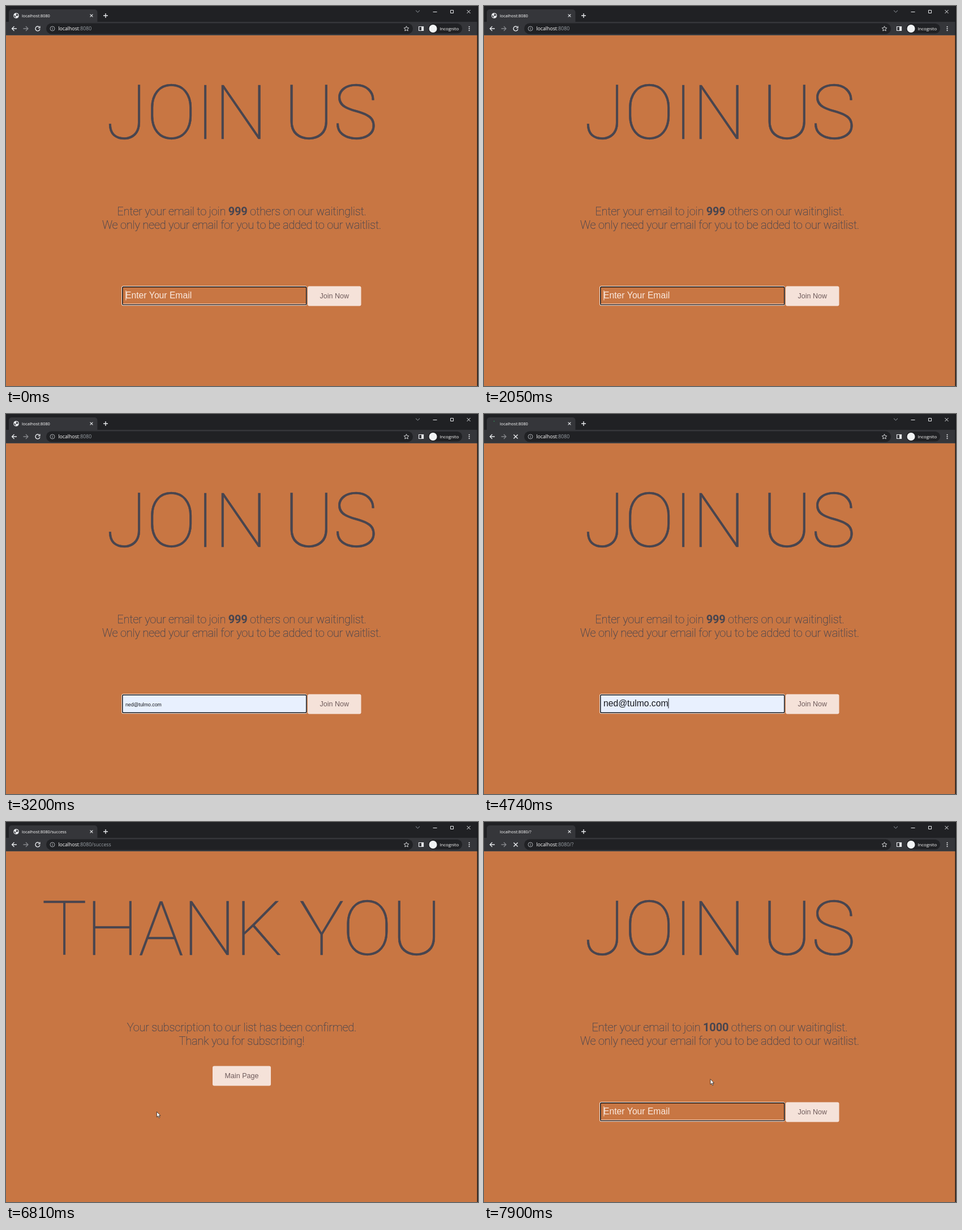
Recreate the animation shown at these times as an HTML page with a canvas. Size 834 by 672 pixels, loop 8000 ms.

```html
<!DOCTYPE html>
<html lang="en">
<head>
<meta charset="utf-8">
<title>Waiting list</title>
<style>
  html, body { margin: 0; width: 100%; height: 100%; overflow: hidden; background: #c87643; }
  canvas { display: block; }
</style>
</head>
<body>
<canvas id="stage" width="834" height="672"></canvas>
<script>
const ctx = document.getElementById('stage').getContext('2d');
const LOOP = 8000;
const CENTER = 416.5;
const EMAIL = 'ned@tulmo.com';

const color = {
  page: '#c87643', ink: '#48454f', cream: '#f5e2d9', buttonText: '#6f5b5b',
  frame: '#202124', toolbar: '#35363a', light: '#e8eaed', dim: '#9aa0a6',
  autofill: '#e8f0fe'
};
const ui = size => `400 ${size}px "Open Sans", sans-serif`;
const arial = size => `400 ${size}px "Liberation Sans", Arial, sans-serif`;
const roboto = (weight, size) => `${weight} ${size}px Roboto, sans-serif`;

function text(str, x, y, font, fill, align = 'left') {
  ctx.font = font;
  ctx.fillStyle = fill;
  ctx.textAlign = align;
  ctx.fillText(str, x, y);
  return ctx.measureText(str).width;
}

function rect(x, y, w, h, fill) {
  ctx.fillStyle = fill;
  ctx.fillRect(x, y, w, h);
}

function round(x, y, w, h, r, fill) {
  ctx.beginPath();
  ctx.roundRect(x, y, w, h, r);
  ctx.fillStyle = fill;
  ctx.fill();
}

function disc(x, y, r, fill) {
  ctx.beginPath();
  ctx.arc(x, y, r, 0, Math.PI * 2);
  ctx.fillStyle = fill;
  ctx.fill();
}

// Strokes an SVG path placed at x, y.
function icon(x, y, d, stroke = color.light, width = 1.2) {
  ctx.save();
  ctx.translate(x, y);
  ctx.strokeStyle = stroke;
  ctx.lineWidth = width;
  ctx.stroke(new Path2D(d));
  ctx.restore();
}

function cross(x, y, r, width = 1.1) {
  icon(x, y, `M${-r} ${-r}L${r} ${r}M${r} ${-r}L${-r} ${r}`, color.light, width);
}

function globe(x, y) {
  disc(x, y, 4.8, color.light);
  ctx.save();
  ctx.translate(x, y);
  ctx.fillStyle = color.toolbar;
  ctx.fill(new Path2D('M-3.7 -1L-1 1.2L-1 3.6Q-3.8 2.8 -3.7 -1ZM0 -3.8Q3.6 -3 3.7 .2L1.6 -.2L1.2 1.2L-.9 -.6L.6 -1.8Z'));
  ctx.restore();
}

function tabBar(title, favicon) {
  rect(0, 0, 834, 28, color.frame);
  round(5, 6, 156.5, 24, [5, 5, 0, 0], color.toolbar);
  if (favicon === 'globe') globe(18, 17);
  else if (favicon) rect(17, 12, 1.5, 1.5, favicon);
  text(title, 28, 19.6, ui(7.4), '#fff');
  cross(151, 17, 2.4);
  icon(176, 17, 'M-4 0H4M0 -4V4', color.light, 1.4);
  icon(727.5, 9.5, 'M-3.5 -1.7L0 1.7L3.5 -1.7', color.dim, 1);
  icon(758, 10.5, 'M-3.5 0H3.5', color.light, 1);
  icon(788, 10, 'M-2.5 -2.5H2.5V2.5H-2.5Z', color.light, 1);
  cross(817.5, 10, 3, 1);
}

function toolbar(path, loading) {
  rect(0, 28, 834, 23, color.toolbar);
  rect(0, 51, 834, 1, '#504b49');
  icon(14.5, 40, 'M4.5 0H-4M0 -4L-4 0L0 4', color.light, 1.3);
  icon(35, 40, 'M-4.5 0H4M0 -4L4 0L0 4', '#85878b', 1.3);
  if (loading) cross(56, 40, 3.6, 1.4);
  else {
    icon(56, 40, 'M3 -2.6A4 4 0 1 0 3.9 1', color.light, 1.4);
    icon(56, 40, 'M4 -4.5V-1.2H.8', color.light, 1.2);
  }

  round(71, 30.5, 648, 19, 9.5, color.frame);
  icon(82, 40, 'M4 0A4 4 0 1 1 -4 0A4 4 0 1 1 4 0M0 -.6V2.2M0 -2.2V-1.2', '#b4b7bb', 0.9);
  const host = text('localhost', 92.3, 43.2, ui(8.75), '#fff');
  text(':8080' + path, 92.3 + host, 43.2, ui(8.75), color.dim);
  icon(707.5, 40, 'M0 -4.3L1.3 -1.4L4.3 -1.1L2 1L2.7 4L0 2.4L-2.7 4L-2 1L-4.3 -1.1L-1.3 -1.4Z', color.light, 0.9);
  icon(733.5, 40, 'M-4 -3.5H4V3.5H-4Z', color.light, 1.2);
  rect(734, 36, 4, 8, color.light);
  round(746, 31, 60, 17.5, 8.75, color.frame);
  disc(754.5, 40, 7, '#f1f3f4');
  text('Incognito', 766.3, 42.8, ui(7.8), '#fff');
  for (const dy of [-3.3, 0, 3.3]) disc(818.5, 40 + dy, 1.05, color.light);
}

// Draws one centred line of [text, weight] runs; a thin outline firms up the hairline strokes.
function centeredLine(y, size, spacing, outline, runs) {
  ctx.letterSpacing = spacing + 'px';
  ctx.strokeStyle = color.ink;
  ctx.lineWidth = outline;
  const widths = runs.map(([str, weight]) => {
    ctx.font = roboto(weight, size);
    return ctx.measureText(str).width;
  });
  let x = CENTER - (widths.reduce((a, b) => a + b) - spacing) / 2;
  runs.forEach(([str, weight], i) => {
    text(str, x, y, roboto(weight, size), color.ink);
    if (weight === 100) ctx.strokeText(str, x, y);
    x += widths[i];
  });
  ctx.letterSpacing = '0px';
}

const heading = str => centeredLine(235, 133.33, -1.7, 0.6, [[str, 100]]);
const bodyLine = (y, ...runs) => centeredLine(y, 20, -0.21, 0.25, runs);

function button(label, x, y, w, h) {
  round(x, y, w, h, 3, color.cream);
  text(label, x + w / 2, y + h / 2 + 4.2, arial(12.5), color.buttonText, 'center');
}

function inputBox({ value = '', filled = false, preview = false, caret = false }) {
  round(204, 495, 328, 35, 3.5, '#fbeee6');
  round(205, 496, 326.5, 33, 2.5, '#101014');
  round(206.5, 497.5, 323.5, 30, 1, filled ? color.autofill : color.page);
  if (!filled) rect(206.5, 526.5, 323.5, 1, color.cream);

  const fill = filled ? '#16181c' : '#fae9df';
  const font = arial(preview ? 8.75 : 15.7);
  const width = text(value || 'Enter Your Email', 211, 517, font, fill);
  if (caret) rect(211.4 + (value ? width - 0.4 : 0), 503, 1, 17.5, fill);
}

function joinPage(count, field) {
  heading('JOIN US');
  bodyLine(370, ['Enter your email to join ', 100], [count, 700], [' others on our waitinglist.', 100]);
  bodyLine(394, ['We only need your email for you to be added to our waitlist.', 100]);
  inputBox(field);
  button('Join Now', 533, 495.5, 94.5, 35);
}

function thanksPage() {
  heading('THANK YOU');
  bodyLine(370, ['Your subscription to our list has been confirmed.', 100]);
  bodyLine(394, ['Thank you for subscribing!', 100]);
  button('Main Page', 365, 431.5, 103, 35);
}

function pointer(x, y) {
  ctx.save();
  ctx.translate(x, y);
  const shape = new Path2D('M.4 .4V9.8L2.6 7.8L4.2 11.4L5.7 10.7L4.1 7.3H7Z');
  ctx.fillStyle = '#fff';
  ctx.fill(shape);
  ctx.strokeStyle = '#1a1a1a';
  ctx.lineWidth = 0.75;
  ctx.stroke(shape);
  ctx.restore();
}

function pointerAt(t) {
  if (t < 6810) return [244, 514];
  if (t >= 7670) return [399.6, 454.3];
  const step = Math.min(11, Math.floor((t - 6810) / 78) + 1);
  const along = 1 - (1 - step / 11) ** 1.6;
  return [244 + 155 * along, 514 - 59 * along ** 1.7].map(Math.round);
}

function fieldAt(t) {
  if (t < 2470) return { caret: t < 480 || (t >= 980 && t < 1560) || t >= 2050 };
  if (t < 3200) return { value: EMAIL.slice(0, t < 2540 ? 1 : t < 2700 ? 2 : 3), caret: true };
  if (t < 3690) return { value: EMAIL, filled: true, preview: true };
  return { value: EMAIL, filled: true, caret: t < 4180 || t >= 4740 };
}

function draw(t) {
  const thanks = t >= 4810 && t < 7900;
  const back = t >= 7900;
  const loading = (t >= 4740 && t < 4900) || back;
  const path = thanks ? '/success' : back ? '/?' : '';
  const favicon = !loading ? 'globe' : back ? '' : thanks ? '#55585c' : '#2f8a55';

  rect(0, 0, 834, 672, color.page);
  tabBar('localhost:8080' + path, favicon);
  toolbar(path, loading);
  if (thanks) thanksPage();
  else joinPage(back ? '1000' : '999', back ? { caret: true } : fieldAt(t));
  rect(832.5, 0, 1.5, 672, '#17181a');
  if (t >= 4810) pointer(...pointerAt(t));
}

const start = performance.now();
function tick() {
  draw((performance.now() - start) % LOOP);
  requestAnimationFrame(tick);
}
tick();
</script>
</body>
</html>
```
